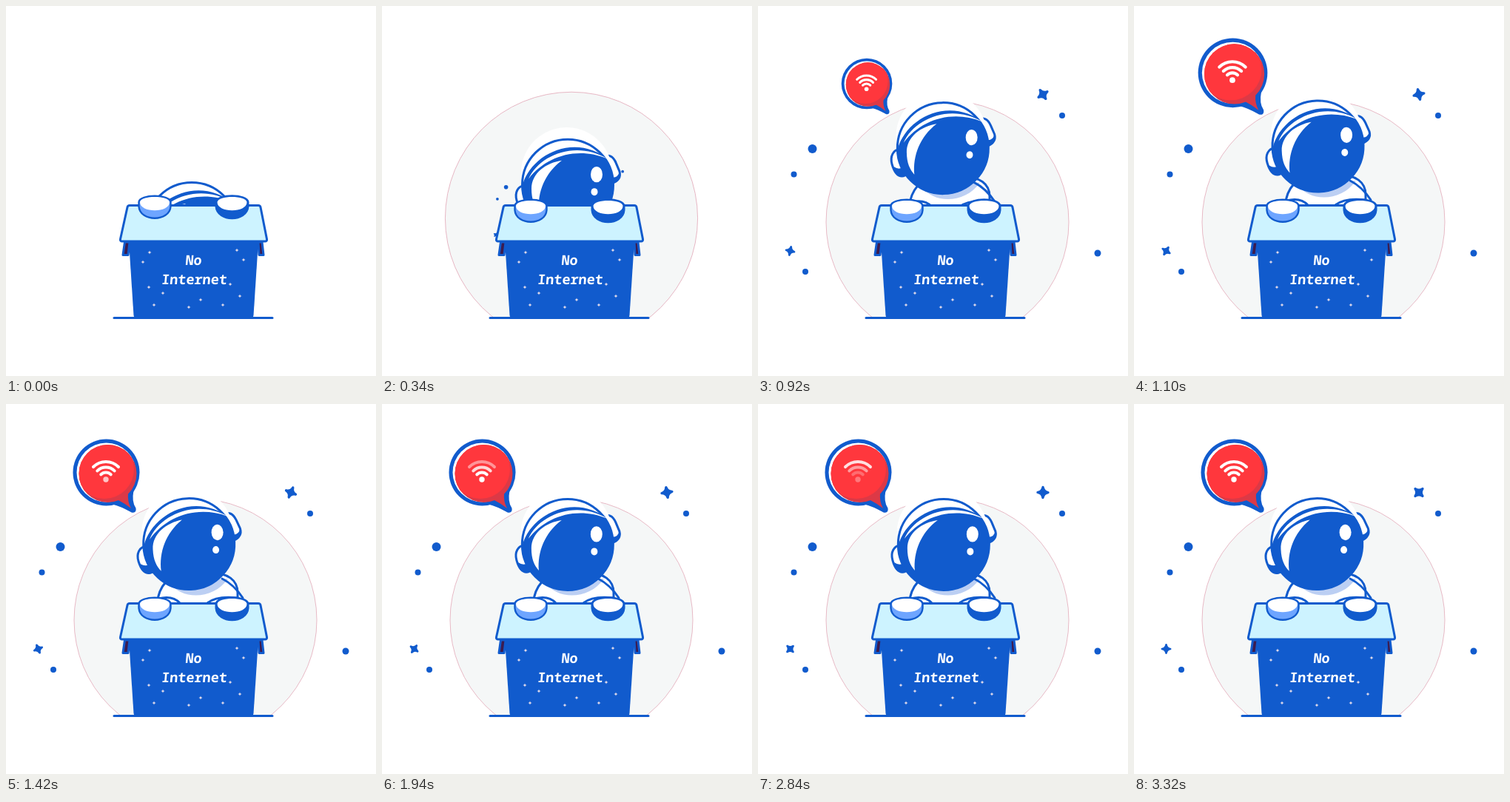
Animation, 500 px wide and 500 px high, one loop 3420 ms. Source, as an HTML page:

```html
<!DOCTYPE html>
<html lang="en">
<head>
<meta charset="utf-8">
<title>No Internet</title>
<style>
html, body { margin: 0; width: 100%; height: 100%; overflow: hidden; background: #fff; }
svg { display: block; width: 100vw; height: 100vh; }
.blue { fill: #115bcd; }
.white { fill: #fff; }
.line { stroke: #115bcd; stroke-width: 3; stroke-linejoin: round; stroke-linecap: round; }
.none { fill: none; }
text { fill: #fff; font: bold 18.5px "Noto Sans Mono", monospace; text-anchor: middle; }
</style>
</head>
<body>
<svg viewBox="0 0 500 500">
  <defs>
    <path id="spark" d="M0-7Q1 -1 7 0Q1 1 0 7Q-1 1-7 0Q-1-1 0-7Z" class="blue"
      stroke="#115bcd" stroke-width="3.4" stroke-linejoin="round"/>
    <clipPath id="floor"><rect width="500" height="422"/></clipPath>
    <clipPath id="disc"><circle cx="137.5" cy="94" r="39"/></clipPath>
    <path id="fist" d="M179.500 270C180 259 222 259 222.500 270V276C221 297 181 297 179.500 276Z"/>
    <path id="back" class="white" stroke="none" d="M181 270C182 260.500 220 260.500 221 270C221 285 181 285 181 270Z"/>
  </defs>

  <g clip-path="url(#floor)">
    <circle id="halo" cx="256" cy="292" r="164" fill="#f5f7f7" stroke="#e3a9b8" stroke-width=".8"/>
  </g>

  <g id="sparks" class="blue">
    <circle cx="73.5" cy="193" r="6"/>
    <circle cx="48.5" cy="227.5" r="4"/>
    <circle cx="64" cy="359" r="4"/>
    <circle cx="459" cy="334" r="4.5"/>
    <circle cx="411" cy="148" r="4"/>
    <g transform="translate(385 119.5)"><use id="starR" href="#spark"/></g>
    <g transform="translate(43.5 331) scale(.8)"><use id="starL" href="#spark"/></g>
  </g>

  <g id="body">
    <path class="white line" d="M205 275C203 255 214 235 235 228H275C300 228 313 238 313 255V275Z"/>
    <path fill="#bccff3" d="M222 242C237 265 280 265 300 236Z"/>
    <path class="none line" d="M206 263Q225 258 235 269M272 269Q285 259 312 262M292 236Q308 244 320 262"/>
  </g>

  <g id="head">
    <path class="white line" d="M193 191C184 191 179 200 182 211C185 222 190 228 197 227L205 224Z"/>
    <path class="blue" d="M184 214Q193 220 198 213L206 224L197 228Q187 227 184 214Z"/>
    <path class="white line" d="M298 153C306 148 312 151 316 160L321 172C323 180 319 185 311 188Z"/>
    <path class="blue" d="M321 172Q319 180 312 180L311 188Q324 184 321 172Z"/>
    <circle class="blue" cx="251" cy="190" r="62"/>
    <path class="white" d="M190 190A61.500 61.500 0 0 1 309 158C262 118 202 148 190 190Z"/>
    <circle class="none line" cx="251" cy="190" r="61.5"/>
    <path class="white" d="M198 182C212 150 262 129 305 155C264 138 222 151 198 182Z"/>
    <path class="white" d="M243 157C222 160 202 174 202 195C202 210 206 218 212 225C210 200 220 174 243 157Z"/>
    <ellipse class="white" cx="290" cy="176" rx="8" ry="10.7"/>
    <ellipse class="white" cx="287" cy="199.5" rx="4.5" ry="5"/>
  </g>

  <g class="line">
    <path fill="#3b1c50" d="M160.500 319L158 336.500H165L167 319ZM341 319L342 336.500H348L346 319Z"/>
    <path class="blue" stroke="none" d="M166 318H341L334.500 418Q334 422 331 422H177Q173 422 172.500 418Z"/>
    <path fill="#cdf3ff" d="M167 269.500H341Q343.500 269.500 344 272L352.500 315Q353 318 350 318H157Q154 318 154.500 315L164 272Q164.500 269.500 167 269.500Z"/>
    <path class="none" d="M146 421.500H360"/>
  </g>
  <g id="dust" fill="#f3e6ee"></g>
  <text transform="translate(253 349.500) skewX(-5)">No</text>
  <text transform="translate(254 375.500) skewX(-5)">Internet</text>

  <g id="hands" class="line">
    <use href="#fist" fill="#6ea5ff" stroke-width="2.4"/>
    <use href="#back"/>
    <g transform="translate(104.500 0)">
      <use href="#fist" class="blue"/>
      <use href="#back"/>
    </g>
  </g>

  <g id="bubble">
    <circle class="blue" cx="135.500" cy="92.500" r="45"/>
    <path class="blue line" stroke-width="5" d="M144 134Q156 137 169 144.500Q175 147 174 141Q168 132 171 117Z"/>
    <circle class="white" cx="135.500" cy="92.500" r="40"/>
    <path fill="#dc3946" d="M150 129Q160 134 169 141Q164 132 165 121Z"/>
    <circle cx="137.500" cy="94" r="39" fill="#dc3946"/>
    <circle cx="133" cy="88" r="40" fill="#ff373d" clip-path="url(#disc)"/>
    <g id="wifi" class="none" stroke="#fff" stroke-width="4" stroke-linecap="round"></g>
  </g>
</svg>
<script>
const LOOP = 3420, STEP = 20;
const $ = id => document.getElementById(id);

const SWAY = [[620, 1], [1420, 0], [1880, 1], [2330, 0], [2780, 1], [3230, 0]];
const HALO = [[0, 0], [400, 1.1], [600, 1]];
const SPREAD = [[0, 0], [710, 1]];
const POP = [[800, 0], [1000, 1.165], [1150, 1]];
const HANDS = [[0, -5], [300, 0]];
const FADES = [1300, 2500], FADE_TIME = 565, FADE_GAP = 85;

const DUST = [[194, 333], [185, 346], [193, 380], [212, 388], [200, 404], [247, 407],
  [263, 397], [293, 404], [316, 392], [303, 376], [321, 343], [312, 330]];
$('dust').innerHTML = DUST.map(([x, y]) =>
  `<path d="M${x} ${y - 2.6}l.7 1.9 1.9.7-1.9.7-.7 1.9-.7-1.9-1.9-.7 1.9-.7Z"/>`).join('');

// Signal mark, from the dot outwards
$('wifi').innerHTML = '<circle cx="135" cy="102" r="3.7" fill="#fff" stroke="none"/>' +
  [9.5, 16.5, 24].map(r => {
    const d = r * Math.SQRT1_2;
    return `<path d="M${135 - d} ${102 - d}A${r} ${r} 0 0 1 ${135 + d} ${102 - d}"/>`;
  }).join('');
const waves = [...$('wifi').children];

const wave = u => (1 - Math.cos(Math.PI * u)) / 2;

function track(keys, t) {
  if (t <= keys[0][0]) return keys[0][1];
  for (let i = 1; i < keys.length; i++) {
    const [t0, a] = keys[i - 1], [t1, b] = keys[i];
    if (t < t1) return a + (b - a) * wave((t - t0) / (t1 - t0));
  }
  return keys[keys.length - 1][1];
}

const set = (id, value) => $(id).setAttribute('transform', value);
const scaleAt = (x, y, s) => `translate(${x} ${y}) scale(${s}) translate(${-x} ${-y})`;

function draw(t) {
  const left = Math.max(0, 1 - t / 1080);
  const drop = 110 * left * left;
  const tilt = 2.4 * (track(SWAY, t) - 1);
  const spin = 360 * Math.min(1, t / 3240);

  set('halo', scaleAt(256, 421, track(HALO, t)));
  set('sparks', scaleAt(250, 290, track(SPREAD, t)));
  set('starL', `rotate(${spin})`);
  set('starR', `rotate(${spin + 45})`);
  set('body', `translate(0 ${drop})`);
  set('head', `translate(0 ${drop}) rotate(${tilt} 228 280)`);
  set('hands', `translate(0 ${track(HANDS, t)})`);
  set('bubble', scaleAt(184, 145, track(POP, t)));

  waves.forEach((el, i) => {
    let alpha = 1;
    for (const start of FADES) {
      const u = (t - start - i * FADE_GAP) / FADE_TIME;
      if (u > 0 && u < 1) alpha = 1 - 0.75 * wave(2 * u);
    }
    el.setAttribute('opacity', alpha);
  });
}

const begin = performance.now();
function frame() {
  const t = (performance.now() - begin) % LOOP;
  draw(Math.floor(t / STEP) * STEP);
  requestAnimationFrame(frame);
}
draw(0);
requestAnimationFrame(frame);
</script>
</body>
</html>
```
